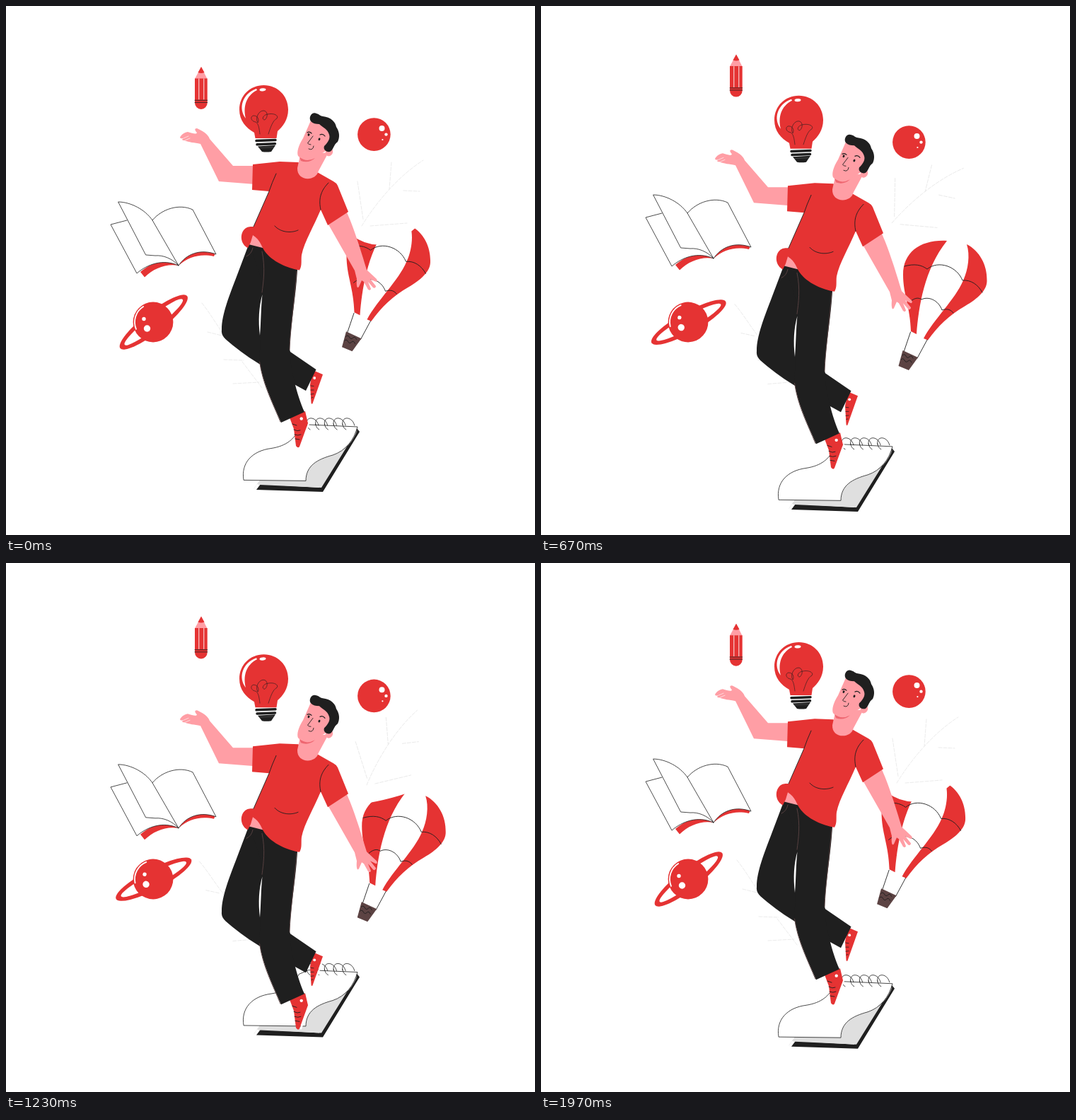
These frames come from a looping animation (748x748 px, 2010 ms). An HTML page with a canvas:

```html
<!DOCTYPE html>
<html lang="en">
<head>
<meta charset="utf-8">
<title>Juggling ideas</title>
<style>
html, body { margin: 0; width: 100%; height: 100%; overflow: hidden; background: #fff; }
canvas { display: block; width: 100vw; height: 100vh; }
</style>
</head>
<body>
<canvas id="stage" width="748" height="748"></canvas>
<script>
const ctx = document.getElementById('stage').getContext('2d');
const RED = '#e53333', PINK = '#ff9ea5', INK = '#1f1f1f', GREY = '#dfdfdf';
const BROWN = '#5c4343', FAINT = '#e2e2e2', WHITE = '#fff';
const LOOP = 2010, STEP = 100 / 3;

const paths = new Map();
function shape(d) {
  if (!paths.has(d)) paths.set(d, new Path2D(d));
  return paths.get(d);
}
function fill(color, d) {
  ctx.fillStyle = color;
  ctx.fill(shape(d));
}
function line(d, width = 0.9, color = INK) {
  ctx.strokeStyle = color;
  ctx.lineWidth = width;
  ctx.stroke(shape(d));
}
function dot(x, y, r, color = WHITE) {
  ctx.fillStyle = color;
  ctx.beginPath();
  ctx.arc(x, y, r, 0, Math.PI * 2);
  ctx.fill();
}
function oval(x, y, rx, ry, tilt, color) {
  ctx.fillStyle = color;
  ctx.beginPath();
  ctx.ellipse(x, y, rx, ry, tilt, 0, Math.PI * 2);
  ctx.fill();
}
function at(dx, dy, draw) {
  ctx.save();
  ctx.translate(dx, dy);
  draw();
  ctx.restore();
}
function turn(x, y, degrees, draw) {
  ctx.save();
  ctx.translate(x, y);
  ctx.rotate(degrees * Math.PI / 180);
  ctx.translate(-x, -y);
  draw();
  ctx.restore();
}
// Eased value on a track of [step, value] keys.
function track(k, ...keys) {
  let i = 1;
  while (i < keys.length - 1 && k > keys[i][0]) i++;
  const [a, from] = keys[i - 1], [b, to] = keys[i];
  const u = Math.max(0, Math.min(1, (k - a) / (b - a)));
  return from + (to - from) * u * u * (3 - 2 * u);
}

function plantRight() {
  ctx.setLineDash([5, 2]);
  line('M503 311 C517 288 548 245 590 218 M545 221 L542 259 M562 261 L585 262 M497 248 L505 302 M515 311 L567 307', 0.7, FAINT);
  ctx.setLineDash([]);
}
function plantLeft() {
  ctx.setLineDash([5, 2]);
  line('M277 420 C290 436 300 455 312 470 M285 461 L305 466 M308 500 L336 501 M321 534 L358 532 M334 503 L362 540', 0.7, FAINT);
  ctx.setLineDash([]);
}

function pencil() {
  fill(PINK, 'M276 86 L267 103 H284.5 Z');
  fill(RED, 'M276 86 L271.5 94 Q276 96 280.5 94 Z M267 102.5 H284.7 V137 A8.85 9 0 0 1 267 137 Z');
  line('M272.8 103 V132 M279.8 103 V132', 0.9, WHITE);
  line('M267 133.3 H284.7 M267 136.4 H284.7', 0.8);
}

function bulb() {
  fill(RED, 'M364.5 112 C384 112 399 127 399 146.5 C399 161 391 171 384 177 L382.5 187 H352.5 L351 179 C339 172 330 162 330 146.5 C330 127 345 112 364.5 112 Z');
  fill(WHITE, 'M339 159 C328 145 334 124 354 117 L355 119 C339 127 335 143 339 159 Z');
  oval(363, 118.3, 4.5, 2.1, -0.1, WHITE);
  line('M359 181 C358 173 357 166 353 164 C346 163 345 156 350 155 C357 155 358 162 356 165 C352 159 357 148 364 148 C370 148 371 157 366 161 C361 161 363 154 370 153 C379 151 386 155 383 159 C377 162 374 172 371 181', 0.6);
  line('M354 190.6 L381 189.6 M355 195.8 L380.5 194.7', 3.5);
  fill(INK, 'M356 198.5 L381 197 L375 206 Q368 207 362 206 Z');
  line('M359 200.7 L378 200', 0.5, '#666');
}

function ball() {
  dot(520.4, 181.6, 23.3, RED);
  dot(531.5, 173, 4);
  dot(537.5, 181.6, 2.2);
  dot(532.4, 189, 1.1);
}

function book() {
  fill(RED, 'M190 376 C205 363 224 357 244 367 C226 364 209 371 196 383.5 Z');
  fill(WHITE, 'M171 303 L148 309 L185 378 C200 365 222 357 244 367 L207 303 Z');
  line('M171 303 L148 309 L185 378 C200 365 222 357 244 367', 0.8);
  fill(RED, 'M244 367 C255 349 277 343 296 349.5 L294 354 C275 350 259 354 244 367 Z');
  const right = 'M207 303 C220 287 245 279 264 288 L297 351 C275 343 255 350 244 367';
  fill(WHITE, right);
  line(right, 0.8);
  const page = 'M159 277 C176 277 197 288 207 303 L244 367 C235 357 222 352 211 353 L198 352 Z';
  fill(WHITE, page);
  line(page, 0.8);
}

function saturn() {
  const tilt = -38 * Math.PI / 180;
  oval(208.8, 447, 60, 14.5, tilt, RED);
  oval(208.8, 447, 52, 8.5, tilt, WHITE);
  dot(208, 447, 28.4, RED);
  ctx.strokeStyle = WHITE;
  ctx.lineWidth = 1.8;
  ctx.beginPath();
  ctx.arc(208, 447, 26, 2.75, 4.15);
  ctx.stroke();
  dot(195, 442.5, 2.7);
  dot(199.5, 456, 4.7);
}

function balloon() {
  fill(WHITE, 'M574 332 C588 330 596 333 602 337 L607 365 L596 390 L542 470 L531 464 L545 370 Z');
  fill(RED, 'M574 332 C538 330 512 347 512 380 C512 408 522 425 523 460 L531 464 C534 425 542 372 574 332 Z');
  fill(RED, 'M602 337 C620 346 631 366 630.5 388 C631 402 617 414 600 424 C577 437 562 452 547 472.5 L541 470 C556 442 585 416 597 388 C604 373 607 352 602 337 Z');
  line('M514 368 C528 364 538 366 546 372 C562 359 588 368 596 388 C608 387 618 394 624 405 M522 418 C530 411 535 413 538 415 C548 410 562 416 567 430 C575 427 580 430 583 434');
  line('M522.5 461 L513 489 M546 472 L532 498');
  fill(BROWN, 'M511.5 487 L533 497 L520 515 L505.5 509 Z');
  line('M511 494 q3 -3 5 1 t5 1 t5 2 M509 500 q3 -3 5 1 t5 1 t5 2', 0.9);
}

function notebook() {
  fill(INK, 'M354 684 L360 676 L443 681 L496 597 L500 602 L448 687 Z');
  fill(GREY, 'M350 683 L359 670 H424 C424 650 440 641 462 635 C480 629 492 614 497 599 L446 681 L359 677 Z');
  fill(WHITE, 'M350 684 L353 684 L358 677 L355 676 Z');
  const page = 'M336 670 C332 646 348 629 375 625.5 C397 622 408 612 414 598 L428 592 L497 595 C492 614 480 629 462 635 C440 641 424 650 424 671 Z';
  fill(WHITE, page);
  line(page, 0.8);
  for (let i = 0; i < 5; i++) {
    const x = 425 + i * 12.7;
    line(`M${x} 592 C${x - 2} 579 ${x + 14} 580 ${x + 17} 593 M${x} 591 Q${x + 1} 597 ${x + 5} 599`, 0.8);
  }
}

function shoes() {
  line('M449 522 L435 562 M428 590 L417 623', 2.4, WHITE);
  fill(RED, 'M434 515 L448 521 L433.5 562 Q432 564 431.5 561 L430 535 Z');
  dot(436.2, 526, 1.9);
  line('M431 537 L435 537.5 M431 543 L435 543 M431 549 L435 548.5 M432 554 L434 553.5', 0.8);
  fill(RED, 'M401 582 L423 573 L427 590 L415 623 Q413 626 410 622 L407 598 Z');
  dot(417.7, 583.5, 2.2);
  line('M405 591 L411 593 M407 599 Q412 602 416 600 M408 606 Q413 608 417 606 M409 612 L415 613', 0.9);
}

function trousers() {
  fill(INK, 'M344 335 L327 380 C316 409 305 436 305 457 C304 467 309 470 321 480 C349 503 388 524 424 544 L438.5 514 L402 489 L375 400 Z');
  fill(INK, 'M344 335 L366 339 L412 373 C410 410 402 455 401 486 C402 513 411 549 422 574 L389 589 C376 559 362 530 358.5 502 L362 390 Z');
  fill(WHITE, 'M362.5 408 C357.5 425 356.5 445 359 466 C360.5 450 360.5 425 362.5 408 Z');
  line('M411 375 C408 415 402 455 401 486 M358.5 503 C363 535 377 561 388 588 M349 342 Q347 351 340 354 M362 347 C367 370 364 390 362 405', 0.9, BROWN);
}

function arms() {
  fill(PINK, 'M352 226 H321 L288 188 C286 181 277 176 270 173 C266 173 267 176 270 179 C269 182 264 180 257 178 C251 179 247 183 246 186 C247 188 249 187 251 187 C248 189 249 190 252 190 C259 193 266 193 275 195 L301 248 L352 252 Z');
  line('M251 187 L258 184 M253 190 L260 187', 0.6, WHITE);
  fill(PINK, 'M456 309 L481 290 C490 308 502 346 510 373 L524 386 C526 389 524 391 521 389 L515 386 L523 396 C523 399 520 400 518 397 L512 390 L516 400 C515 403 512 402 511 399 L506 390 L503 388 L499 397 C497 400 495 397 496 386 L493 374 Z');
}

function shirt() {
  fill(PINK, 'M348 323 L343 337 L367 343 L357 325 Z');
  fill(RED, 'M349 224 L387 220 L413 221 L441 235.5 L463 248 Q467 250 469 254 L484 291 L455 310 L445 288 C435 312 422 333 418 352 C417 360 419 367 415 373.5 C398 371 376 361 366 347 C361 340 360 331 349 324 L346 334 L342 342 C333 338 330 325 336 317 C341 311 346 312 350 312 L372 262 L348 260 Z');
  line('M382 237 Q376 250 372 262 L350 312 M456 250 C444 262 442 274 445 288 M380 311 C389 321 404 321 413 317');
}

function head() {
  fill(PINK, 'M416 211 L412 229 C411 248 438 249 442 233 L456 207 Z');
  fill('#ee6670', 'M415 213 Q424 222 437 215 Q428 223 417 219 Z');
  oval(457, 206.5, 5, 6, 0.5, PINK);
  fill(PINK, 'M431 162 L420 187 C413 198 411 207 413 212 C419 219 434 218 441 212 L452 205 L461 180 L452 166 Z');
  fill(INK, 'M431 163 C427 157 433 149 439 152 C443 153 445 156 448 156 C459 157 466 164 467 171 C472 178 472 186 469 192 C463 196 463 204 458 206 C453 207 448 203 450 198 C454 194 459 188 457 182 C455 174 447 171 443 167 C438 167 434 166 431 163 Z');
  line('M426 179 Q429 177 432 180 M444 182 Q448 180 451 184', 1.2);
  oval(428, 182, 1.4, 1.9, 0.3, INK);
  oval(443, 188.3, 1.4, 1.9, 0.3, INK);
  line('M434 184 L426.5 194 Q428 196 431 196 M428 202 Q434 205 435 198', 0.9);
}

function man() {
  shoes();
  trousers();
  arms();
  shirt();
  head();
}

// The balloon's crown is hidden above a curve that sways over time.
function crownClip(k) {
  const l = track(k, [0, 325], [11, 334], [20, 322], [31, 325], [37, 342], [46, 333], [60, 325]);
  const m = track(k, [0, 337], [11, 331.5], [20, 325], [31, 326], [37, 335], [46, 338], [60, 337]);
  const r = track(k, [0, 313], [11, 330], [20, 325], [31, 326], [37, 321], [46, 324], [60, 313]);
  ctx.beginPath();
  ctx.moveTo(440, l);
  ctx.lineTo(490, l);
  ctx.quadraticCurveTo(532, 2 * m - (l + r) / 2, 580, r);
  ctx.lineTo(680, r);
  ctx.lineTo(680, 560);
  ctx.lineTo(440, 560);
  ctx.clip();
}

function draw(k) {
  ctx.fillStyle = WHITE;
  ctx.fillRect(0, 0, 748, 748);
  ctx.lineCap = ctx.lineJoin = 'round';

  const sway = track(k, [0, 0], [30, 1], [60, 0]);
  const drift = track(k, [0, 0], [23, 1], [60, 0]);

  turn(340, 540, -2 * sway, plantLeft);
  turn(525, 268, track(k, [0, 0], [20, 9.5], [41, -11], [60, 0]), plantRight);
  at(0, track(k, [0, 0], [15, -23.5], [30, 0], [45, -23.5], [60, 0]), pencil);
  at(0, 20 * sway, bulb);
  at(0, track(k, [0, 0], [20, 11], [40, 6], [60, 0]), ball);
  at(0, track(k, [0, 0], [20, -10], [40, 9], [60, 0]), book);
  turn(208, 447, 12 * sway, saturn);
  ctx.save();
  crownClip(k);
  at(32 * drift - 30.5, 28 * drift - 26.7, balloon);
  ctx.restore();
  at(0, track(k, [0, 0], [21.5, 28.3], [42, -24.3], [60, 0]), notebook);
  at(0, 41 * sway, man);
}

const start = performance.now();
function tick() {
  const t = (performance.now() - start) % LOOP;
  draw(Math.min(59, Math.floor((t + 3.4) / STEP)));
  requestAnimationFrame(tick);
}
tick();
</script>
</body>
</html>
```
